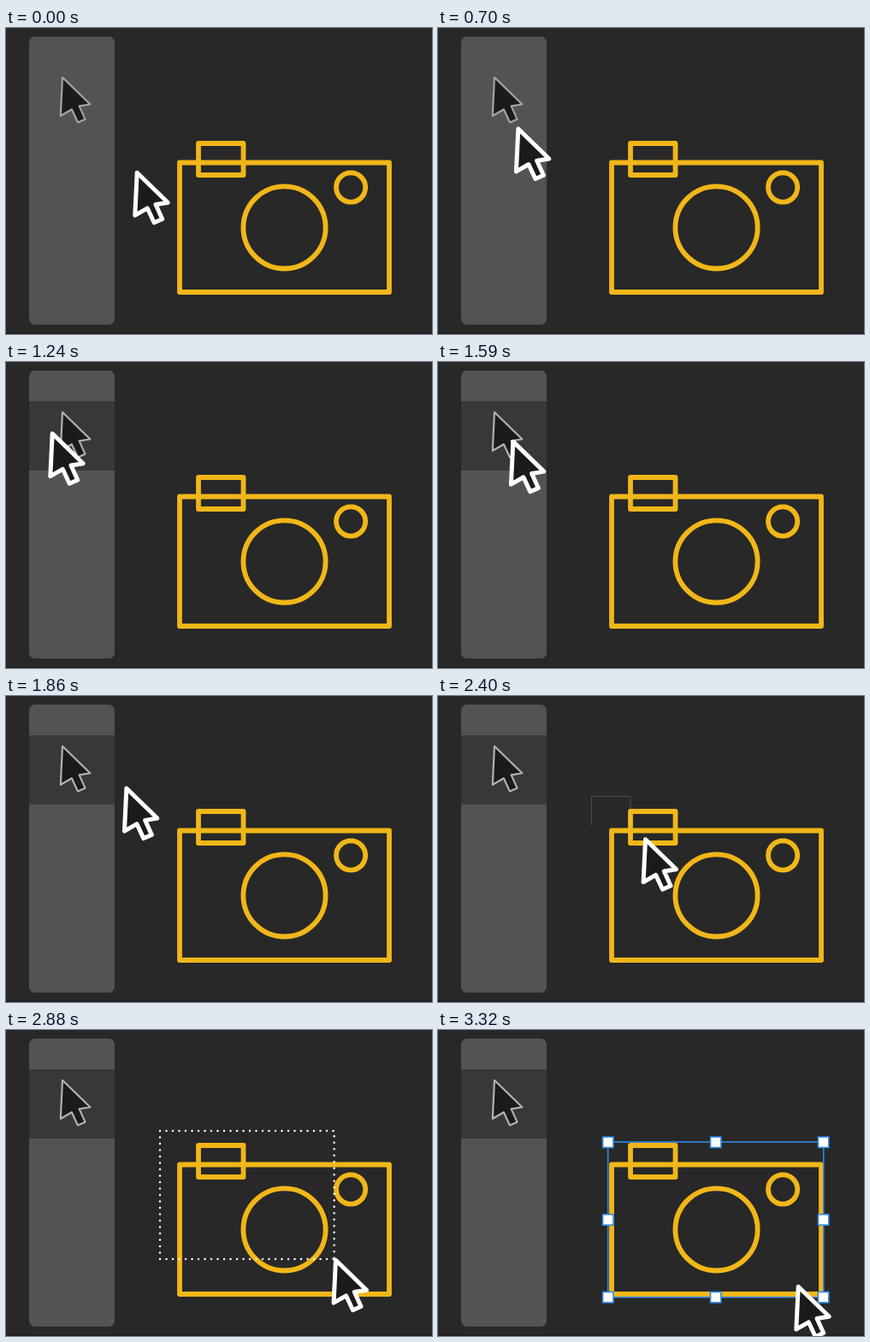
An HTML page for the animation above (4.42 s loop, 498 by 358 pixels).

```html
<!DOCTYPE html>
<html lang="en">
<head>
<meta charset="utf-8">
<title>Marquee selection</title>
<style>
  html, body { margin: 0; width: 100%; height: 100%; overflow: hidden; background: #282828; }
  svg { display: block; width: 498px; height: 358px; }
  .camera { fill: none; stroke: #f1b719; stroke-width: 5.8; stroke-linejoin: round; }
  .arrow { fill: #1b1b1b; stroke-linejoin: round; }
  .marquee { fill: none; stroke: #fff; }
  #thin { stroke-width: 1; }
  #dots { stroke-width: 2.5; stroke-linecap: round; stroke-dasharray: 0 7.5; }
  #selection { fill: none; stroke: #3089e6; stroke-width: 1.6; }
  #selection .handle { fill: #fff; }
</style>
</head>
<body>
<svg viewBox="0 0 498 358">
  <defs>
    <path id="pointer" d="M-.8 .2L35.2 35.2L21 37.5L28.7 54.5L19.2 58.7L11.3 41.8L-3.2 50.2Z"/>
  </defs>
  <rect width="498" height="358" fill="#282828"/>
  <rect y="356" width="498" height="2" fill="#232021"/>
  <rect x="27" y="10" width="100" height="337" rx="7" fill="#535353"/>
  <rect id="highlight" x="27" y="46" width="100" height="81" fill="#383838"/>
  <g id="tool"><use href="#pointer" class="arrow" stroke-width="2.4" transform="scale(.9)"/></g>
  <g class="camera">
    <rect x="203" y="157.5" width="245" height="151.5"/>
    <rect x="225" y="135" width="52.5" height="37"/>
    <circle cx="325.5" cy="233.4" r="48.1"/>
    <circle cx="403.1" cy="186.5" r="17.1"/>
  </g>
  <path id="thin" class="marquee"/>
  <path id="dots" class="marquee"/>
  <g id="selection"><rect x="198.7" y="131" width="252" height="181.7"/></g>
  <g id="cursor"><use href="#pointer" class="arrow" stroke="#fff" stroke-width="5"/></g>
</svg>
<script>
const LOOP = 4420;
const SELECT_AT = 3320;

const el = id => document.getElementById(id);
const progress = (t, start, end) => Math.min(1, Math.max(0, (t - start) / (end - start)));

// Speeds up over the first part `ramp`, cruises, then slows down over the last.
function glide(u, ramp) {
  if (u > .5) return 1 - glide(1 - u, ramp);
  return (u < ramp ? u * u / (2 * ramp) : u - ramp / 2) / (1 - ramp);
}

const lerp = (a, b, p) => a + (b - a) * p;
const between = (from, to, p) => from.map((a, axis) => lerp(a, to[axis], p));

const home = [154, 169], button = [55, 83.5], corner = [167, 115], finish = [422, 300];

function cursorAt(t) {
  if (t < 1420) return between(home, button, progress(t, 343, 940));
  if (t < 2040) return between(button, corner, progress(t, 1420, 1990));
  const p = glide(progress(t, 2040, 3120), .2);
  const bow = 27 * p * p * (1 - p);
  const [x, y] = between(corner, finish, p);
  return [x + bow, y - bow];
}

const marqueeAt = t => between([180, 118], [419, 294], glide(progress(t, 2130, 3120), .27));

function addHandles() {
  const size = 12.4;
  for (let i = 0; i < 9; i++) {
    if (i === 4) continue;
    const box = document.createElementNS("http://www.w3.org/2000/svg", "rect");
    box.setAttribute("class", "handle");
    box.setAttribute("x", 198.8 + 125.9 * (i % 3) - size / 2);
    box.setAttribute("y", 131.3 + 90.7 * Math.floor(i / 3) - size / 2);
    box.setAttribute("width", size);
    box.setAttribute("height", size);
    el("selection").append(box);
  }
}

function draw(t) {
  el("cursor").setAttribute("transform", `translate(${cursorAt(t)})`);

  const active = progress(t, 940, 1240);
  const grey = Math.round(lerp(164, 178, active));
  el("highlight").setAttribute("opacity", active);
  el("tool").setAttribute("transform", `translate(66.7 ${57.6 + active})`);
  el("tool").setAttribute("stroke", `rgb(${grey},${grey},${grey})`);

  const [right, bottom] = marqueeAt(t);
  const open = t < SELECT_AT ? 1 : 0;
  const dotted = progress(t, 2400, 2580);
  el("thin").setAttribute("d", `M179.5 ${bottom}V117.5H${right - .5}V${bottom}`);
  el("dots").setAttribute("d", `M180 118H${right}V${bottom}M180 118V${bottom}H${right}`);
  el("thin").setAttribute("opacity", open * .17 * progress(t, 2130, 2340) * (1 - dotted));
  el("dots").setAttribute("opacity", open * dotted);
  el("selection").setAttribute("visibility", open ? "hidden" : "visible");
}

addHandles();
const start = performance.now();
function tick() {
  draw((performance.now() - start) % LOOP);
  requestAnimationFrame(tick);
}
tick();
</script>
</body>
</html>
```
